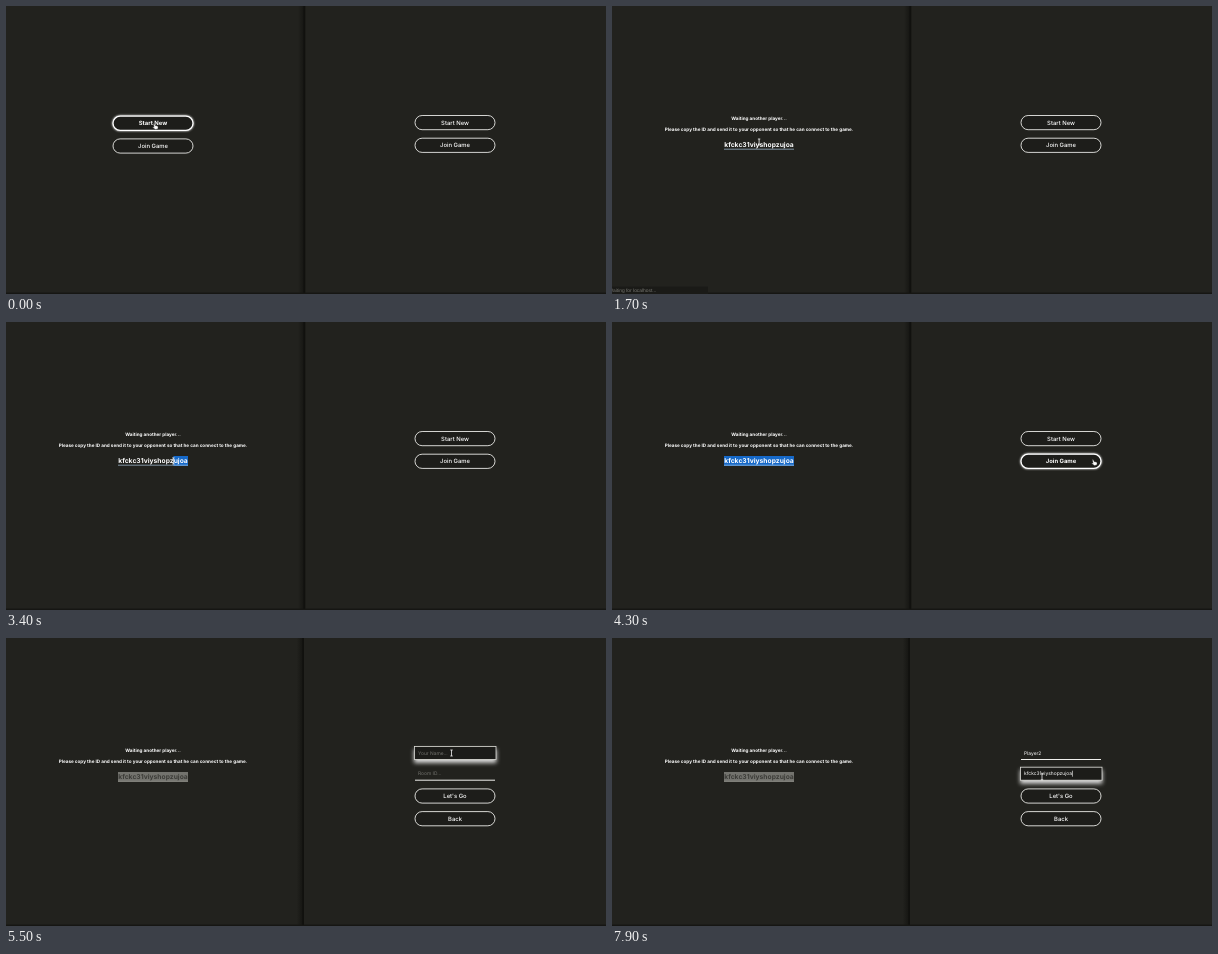
An HTML page for the animation above (8000 ms loop, 600x288 px).

```html
<!DOCTYPE html>
<html lang="en">
<head>
<meta charset="utf-8">
<title>Two player lobby</title>
<style>
  html, body { margin: 0; width: 100%; height: 100%; overflow: hidden; background: #22221e; }
  svg { display: block; width: 600px; height: 288px; }
  text { font-family: Inter, "Open Sans", sans-serif; fill: #fff; text-rendering: geometricPrecision; white-space: pre; }
  .btn rect { fill: #1d1d1a; stroke: #e9e9e6; stroke-width: .9; }
  .btn text { font-size: 5.9px; font-weight: 500; text-anchor: middle; }
  .btn.on rect { stroke: #fff; stroke-width: 1.3; filter: drop-shadow(0 0 1px #fff); }
  .btn.on text { font-weight: 700; }
  .field text { font-size: 4.9px; }
  .field .hint { fill: #74746f; }
  .field .line { stroke: #f0f0ed; stroke-width: 1; }
  .field .box { fill: #1c1c19; stroke: #deded9; stroke-width: .8; filter: drop-shadow(0 3px 2px rgba(255,255,255,.85)); }
  .field .caret { stroke: #fff; stroke-width: .6; }
  .note { font-size: 4.63px; font-weight: 700; text-anchor: middle; }
  .room text { font-size: 6.74px; font-weight: 700; text-anchor: middle; }
  .room path { stroke: #a9c3dc; stroke-width: .7; }
  .room .mark { fill: #1669c9; }
  .room.idle .mark { fill: #73736e; }
  .room.idle text { fill: #3b3b37; }
  .room.idle path { stroke: #8b8b86; }
  .status text { font: 4.9px "Liberation Sans", Arial, sans-serif; fill: #777772; }
  .cursor path { fill: #fff; stroke: #34342f; stroke-width: .4; stroke-linejoin: round; }
  .cursor .beam { fill: none; stroke: #f4f4f4; stroke-width: .8; }
</style>
</head>
<body>
<svg id="stage" viewBox="0 0 600 288">
  <defs>
    <linearGradient id="shade">
      <stop offset="0" stop-color="#0c0c09" stop-opacity="0"/>
      <stop offset="1" stop-color="#0c0c09" stop-opacity=".55"/>
    </linearGradient>
  </defs>
  <rect width="600" height="288" fill="#22221e"/>
</svg>
<script>
const LOOP = 8000, STEP = 100;
const ROOM = 'kfckc31viyshopzujoa';
const stage = document.getElementById('stage');

function el(tag, attrs, parent = stage, label) {
  const node = document.createElementNS('http://www.w3.org/2000/svg', tag);
  for (const key in attrs) node.setAttribute(key, attrs[key]);
  if (label) node.textContent = label;
  return parent.appendChild(node);
}
const group = (name, parent) => el('g', { class: name }, parent);
const show = (node, on) => { node.style.display = on ? '' : 'none'; };

function button(parent, x, cy, label) {
  const g = group('btn', parent);
  el('rect', { x, y: cy - 7.1, width: 80, height: 14.2, rx: 7.1 }, g);
  el('text', { x: x + 40, y: cy + 2.1 }, g, label);
  return g;
}

function field(parent, x, y, hint) {
  const g = group('field', parent);
  const line = el('path', { class: 'line', d: `M${x} ${y + 13}h80` }, g);
  const box = el('rect', { class: 'box', x: x - .6, y, width: 81.6, height: 13 }, g);
  const text = el('text', { x: x + 3, y: y + 8.1 }, g);
  const caret = el('path', { class: 'caret', d: `M0 ${y + 3.5}v6` }, g);
  return (value, focus, blink = true) => {
    show(line, !focus);
    show(box, focus);
    text.textContent = value || hint;
    text.setAttribute('class', value ? '' : 'hint');
    show(caret, focus && blink);
    const end = value ? text.getComputedTextLength() + .4 : 0;
    caret.setAttribute('transform', `translate(${x + 3 + end} 0)`);
  };
}

// window edges
const edge = group('edge');
el('rect', { x: 292, y: 0, width: 6, height: 288, fill: 'url(#shade)' }, edge);
el('rect', { x: 297.6, y: 0, width: 1.7, height: 288, fill: '#11110e' }, edge);
el('rect', { x: 0, y: 286.6, width: 600, height: 1.4, fill: '#161613' });

// left player
const menuL = group('menu');
const startL = button(menuL, 107, 117.2, 'Start New');
button(menuL, 107, 140, 'Join Game');

const formL = group('form');
const nameL = field(formL, 107, 108.8, 'Your Name...');
const goL = button(formL, 107, 137.2, 'Start');
button(formL, 107, 159.9, 'Back');

const wait = group('wait');
el('text', { class: 'note', x: 147, y: 114.2 }, wait, 'Waiting another player...');
el('text', { class: 'note', x: 147, y: 124.5 }, wait,
  'Please copy the ID and send it to your opponent so that he can connect to the game.');
const room = group('room', wait);
const mark = el('rect', { class: 'mark', y: 134, height: 10 }, room);
el('path', { d: 'M112 143.2h70' }, room);
el('text', { x: 147, y: 141.2 }, room, ROOM);

const status = group('status');
el('rect', { x: 0, y: 280.6, width: 96, height: 7.4, fill: '#1a1a17' }, status);
el('text', { x: -3.5, y: 286.2 }, status, 'Waiting for localhost...');

// right player
const menuR = group('menu');
const startR = button(menuR, 409, 116.6, 'Start New');
const joinR = button(menuR, 409, 139.3, 'Join Game');

const formR = group('form');
const nameR = field(formR, 409, 108.5, 'Your Name...');
const roomR = field(formR, 409, 129.2, 'Room ID...');
button(formR, 409, 158, "Let's Go");
button(formR, 409, 180.7, 'Back');

// pointer shapes, each with its hot spot at 0,0
const cursor = group('cursor');
const shapes = {
  hand: el('path', { d: 'M-.6 .2q.6-.6 1 .2l.9 1.7 1.9.3q.9.3.9 1.2l-.3 1.9-2.4.4-2.6-1.9q-.3-.8.6-.6l.7.3z' }, cursor),
  arrow: el('path', { d: 'M0 0v5l1.2-1.1.9 1.8.8-.4-.9-1.7h1.6z' }, cursor),
  beam: el('path', { class: 'beam', d: 'M-1.2-3h2.4M0-3v6M-1.2 3h2.4' }, cursor)
};

// time, x, y
const route = [
  [0, 148, 117.5], [900, 148, 118], [1200, 147.5, 130.5], [1300, 147.5, 136], [1800, 147, 136],
  [1900, 165, 134], [2100, 360, 121], [2200, 430, 117], [2300, 436, 117], [2400, 436, 117],
  [2500, 435, 126], [2600, 434, 133.5], [2700, 396, 146], [2800, 300, 153], [2900, 200, 152],
  [3000, 164, 149], [3200, 181, 139], [3300, 181, 139], [3800, 113, 138.6], [3900, 150, 138.6],
  [4000, 250, 138.6], [4200, 531, 138.6], [4300, 481, 137.6], [4500, 480, 138],
  [4800, 445.5, 115], [6800, 445.5, 115], [7200, 432.5, 134], [7800, 432.5, 134],
  [7900, 430, 138.8], [LOOP, 430, 138.8]
];
const looks = [
  [0, 'hand'], [300, 'beam'], [1100, 'hand'], [1500, 'arrow'], [1700, 'beam'], [1900, 'arrow'],
  [2200, 'hand'], [2700, 'arrow'], [3100, 'beam'], [4000, 'arrow'], [4300, 'hand'],
  [4500, 'arrow'], [4700, 'beam']
];
const typedL = [[0, ''], [1000, 'Pla'], [1100, 'Player'], [1200, 'Player1']];
const typedR = [[0, ''], [5700, 'P'], [5900, 'Pl'], [6000, 'Pla'], [6100, 'Play'],
  [6200, 'Playe'], [6300, 'Player'], [6500, 'Player2']];

const within = (t, a, b) => t >= a && t < b;
const current = (rows, t) => rows.filter(row => row[0] <= t).pop()[1];

function place(t) {
  const i = route.findIndex(row => row[0] > t);
  const [t0, x0, y0] = route[i - 1], [t1, x1, y1] = route[i];
  const k = (t - t0) / (t1 - t0);
  return [x0 + (x1 - x0) * k, y0 + (y1 - y0) * k];
}

function draw(t) {
  const [x, y] = place(t);
  const look = current(looks, t);
  cursor.setAttribute('transform', `translate(${x} ${y})`);
  for (const name in shapes) show(shapes[name], name === look);

  show(menuL, t < 300);
  show(formL, within(t, 300, 1500));
  show(wait, t >= 1700);
  show(status, within(t, 1700, 1900));
  startL.classList.toggle('on', t < 300);
  goL.classList.toggle('on', within(t, 1300, 1500));
  nameL(current(typedL, t), within(t, 700, 1400));

  const from = t < 3400 ? 182 : t < 3800 ? Math.max(112, x) : 112;
  mark.setAttribute('x', from);
  mark.setAttribute('width', 182 - from);
  room.classList.toggle('idle', t >= 4500);

  show(menuR, t < 4500);
  show(formR, t >= 4500);
  startR.classList.toggle('on', within(t, 2200, 2500));
  joinR.classList.toggle('on', within(t, 4300, 4500));
  nameR(current(typedR, t), within(t, 4900, 7200), !within(t, 5500, 5700));
  roomR(t >= 7700 ? ROOM : '', t >= 7200, !within(t, 7600, 7700));
  edge.setAttribute('transform', `translate(${t < 4500 ? 0 : -1.3} 0)`);
}

function tick() {
  const t = performance.now() % LOOP;
  draw(Math.floor(t / STEP) * STEP);
  requestAnimationFrame(tick);
}
tick();
</script>
</body>
</html>
```
